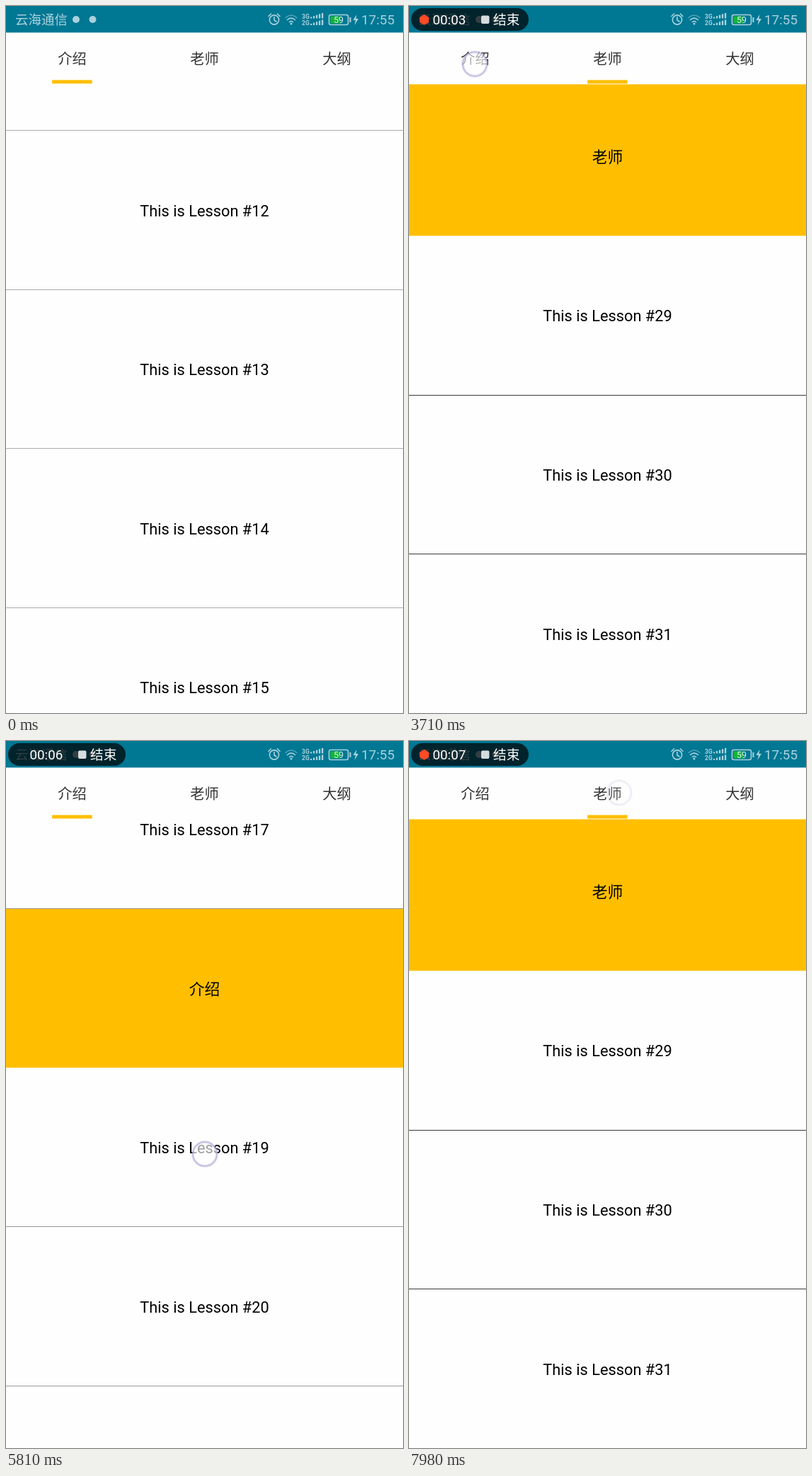
An HTML page for the animation above (8000 ms loop, 561x998 px).

```html
<!DOCTYPE html>
<html lang="zh">
<head>
<meta charset="utf-8">
<title>Lesson tabs</title>
<style>
  html, body { margin: 0; width: 100%; height: 100%; overflow: hidden; background: #fefefe; }
  svg { display: block; width: 100%; height: 100%; }
  text { font-family: Roboto, "Noto Sans CJK SC", "Noto Sans CJK", sans-serif; }
  .mid { text-anchor: middle; }
  .icon { fill: none; stroke: #a9d2de; stroke-width: 1.6; stroke-linecap: round; }
  .solid { fill: #a9d2de; }
</style>
</head>
<body>
<svg viewBox="0 0 561 998" xmlns="http://www.w3.org/2000/svg">
  <rect width="561" height="998" fill="#fefefe"/>
  <g id="list"></g>

  <rect y="37" width="561" height="73.5" fill="#fefefe"/>
  <g id="tabs" class="mid" font-size="20.3" fill="#333"></g>
  <rect id="bar" y="104.5" width="56.5" height="5" fill="#ffbf00"/>

  <rect width="561" height="37.5" fill="#007793"/>
  <text class="solid" x="13" y="26" font-size="18.5">云海通信</text>
  <circle class="solid" cx="99" cy="19" r="5"/>
  <circle class="solid" cx="122.500" cy="19" r="5"/>
  <g class="icon">
    <circle cx="379" cy="19.500" r="6.600"/>
    <path d="M379 15.500V20l3 2M371 14.500l3.500-3.500M387 14.500l-3.500-3.500"/>
    <path d="M395 16.500q8-7 16 0" opacity=".5"/>
    <path d="M397.500 19.500q5.500-4.600 11 0M400.500 22.500q2.500-2 5 0"/>
  </g>
  <circle class="solid" cx="403" cy="25" r="1.500"/>
  <g class="solid" font-size="8.500" font-weight="700">
    <text x="418" y="17.500">3G</text>
    <text x="418" y="27">2G</text>
  </g>
  <g id="signal" class="solid"></g>
  <rect x="456.500" y="12.500" width="27" height="14" rx="2.500" class="icon" stroke-width="1.300"/>
  <rect x="458.500" y="14.500" width="14" height="10" fill="#13b435"/>
  <rect x="485.500" y="16" width="2" height="7" class="solid"/>
  <text class="mid" x="470" y="24.300" font-size="12.500" fill="#d8eef2">59</text>
  <path class="solid" d="M495.500 12l-5 8h3.500l-1.500 7 5.500-9h-3.500z"/>
  <text class="solid" x="502" y="26" font-size="18.900">17:55</text>

  <g id="pill">
    <rect x="3" y="3" width="166" height="32" rx="16" fill="#000" fill-opacity=".7"/>
    <path id="dot" d="M21.500 12l6.500 3.700v7.400l-6.500 3.700-6.500-3.700v-7.400z" fill="#ff4a26"/>
    <text id="clock" x="33.500" y="26" font-size="18.800" fill="#fff"></text>
    <rect x="102" y="13.500" width="11.500" height="11.500" rx="2" fill="#d5dcde"/>
    <text x="119" y="26" font-size="18.700" fill="#fff">结束</text>
  </g>

  <g id="touch">
    <circle r="17" fill="#fff" fill-opacity=".62" stroke="#a79fd2" stroke-opacity=".28" stroke-width="4"/>
    <circle r="17" fill="none" stroke="#b3abd6" stroke-opacity=".75" stroke-width="1.500"/>
  </g>
</svg>
<script>
const $ = id => document.getElementById(id);
const LOOP = 8000, PITCH = 224.6, SNAP = 99.8, SLIDE = 200, FADE = 620;
const NAMES = ['介绍', '老师', '大纲'];
const tabX = i => 93.5 + 187 * i;
const firstRow = i => 18 + 10 * i;
const clamp = v => Math.max(0, Math.min(1, v));

function add(parent, tag, attrs, content = '') {
  const el = document.createElementNS('http://www.w3.org/2000/svg', tag);
  for (const k in attrs) el.setAttribute(k, attrs[k]);
  el.textContent = content;
  return parent.appendChild(el);
}

// Linear interpolation through [time, value] pairs
function track(keys, t) {
  if (t <= keys[0][0]) return keys[0][1];
  for (let i = 1; i < keys.length; i++) {
    const [a, u] = keys[i - 1], [b, v] = keys[i];
    if (t < b) return u + (v - u) * (t - a) / (b - a);
  }
  return keys[keys.length - 1][1];
}

const taps = [
  { tab: 1, x: 280, y: 78, down: 420, up: 610 },
  { tab: 2, x: 470, y: 77, down: 1420, up: 1600 },
  { tab: 1, x: 282, y: 80, down: 2750, up: 2950 },
  { tab: 0, x: 93, y: 82, down: 3560, up: 3850 },
  { tab: 1, x: 297, y: 73, down: 7300, up: 7540 }
];
const drag = { down: 4680, up: 6720 };
const dragRow = [[4740, SNAP], [4970, 133.8], [5040, 145], [5400, 192], [5810, 236.5], [6100, 267], [6370, 284.3]];
const dragX = [[4680, 294], [4970, 291], [5810, 281], [6370, 279]];
const dragY = [[4680, 440], [4970, 488], [5040, 498], [5400, 541], [5810, 583], [6100, 614], [6370, 631]];
const ticks = [1470, 2490, 3440, 4200, 4900, 5750, 6800];

NAMES.forEach((name, i) => add($('tabs'), 'text', { x: tabX(i), y: 81.7 }, name));
for (let r = 0; r < 2; r++)
  for (let i = 0; i < 5; i++) {
    const h = 2 + i * 1.4;
    add($('signal'), 'rect', { x: 430 + i * 4, y: 17.5 + r * 9.5 - h, width: 2.3, height: h });
  }

const rows = Array.from({ length: 6 }, () => {
  const g = add($('list'), 'g', {});
  return {
    g,
    fill: add(g, 'rect', { width: 561, height: PITCH, fill: '#ffbf00' }),
    line: add(g, 'rect', { width: 561, height: 1 }),
    label: add(g, 'text', { class: 'mid', x: 280.5, 'font-size': 21.8 })
  };
});

function drawList(base, y, ink) {
  const start = base - Math.ceil((y - 37) / PITCH);
  rows.forEach((row, i) => {
    const n = start + i, top = y + (n - base) * PITCH;
    const head = n % 10 === 8, afterHead = n % 10 === 9;
    row.fill.setAttribute('y', top);
    row.fill.setAttribute('visibility', head ? 'visible' : 'hidden');
    row.line.setAttribute('y', Math.floor(top));
    row.line.setAttribute('fill', ink);
    row.line.setAttribute('visibility', afterHead ? 'hidden' : 'visible');
    row.label.setAttribute('y', top + (head ? 121.5 : 121));
    row.label.textContent = head ? NAMES[(n - 18) / 10] : 'This is Lesson #' + n;
  });
}

function drawTouch(t) {
  const p = [...taps, drag].find(q => t >= q.down && t < q.up + FADE);
  const alpha = p ? clamp((t - p.down) / 40) * (1 - clamp((t - p.up) / FADE)) : 0;
  $('touch').setAttribute('opacity', alpha);
  if (!p) return;
  const x = p === drag ? track(dragX, t) : p.x;
  const y = p === drag ? track(dragY, t) : p.y;
  $('touch').setAttribute('transform', `translate(${x} ${y})`);
}

function render(t) {
  const done = taps.filter(p => t >= p.up);
  const last = done[done.length - 1];
  const tab = last ? last.tab : 0;
  const prev = done.length > 1 ? done[done.length - 2].tab : 0;

  const dragging = tab === 0 && t > dragRow[0][0];
  const moving = dragging && t < 6360;
  if (!last) drawList(12, 175.5, '#aaa');
  else drawList(firstRow(tab), dragging ? track(dragRow, t) : SNAP, moving ? (t < 5100 ? '#777' : '#999') : '#3a3a3a');

  const k = last ? clamp((t - last.up) / SLIDE) : 1;
  const ease = 1 - (1 - k) ** 2;
  $('bar').setAttribute('x', tabX(prev + (tab - prev) * ease) - 28.3);

  const sec = ticks.filter(s => t >= s).length;
  $('clock').textContent = '00:0' + sec;
  $('dot').setAttribute('visibility', sec % 2 ? 'visible' : 'hidden');
  $('pill').setAttribute('opacity', clamp((t - 420) / 120));
  drawTouch(t);
}

const t0 = performance.now();
function frame() {
  render((performance.now() - t0) % LOOP);
  requestAnimationFrame(frame);
}
render(0);
requestAnimationFrame(frame);
</script>
</body>
</html>
```
